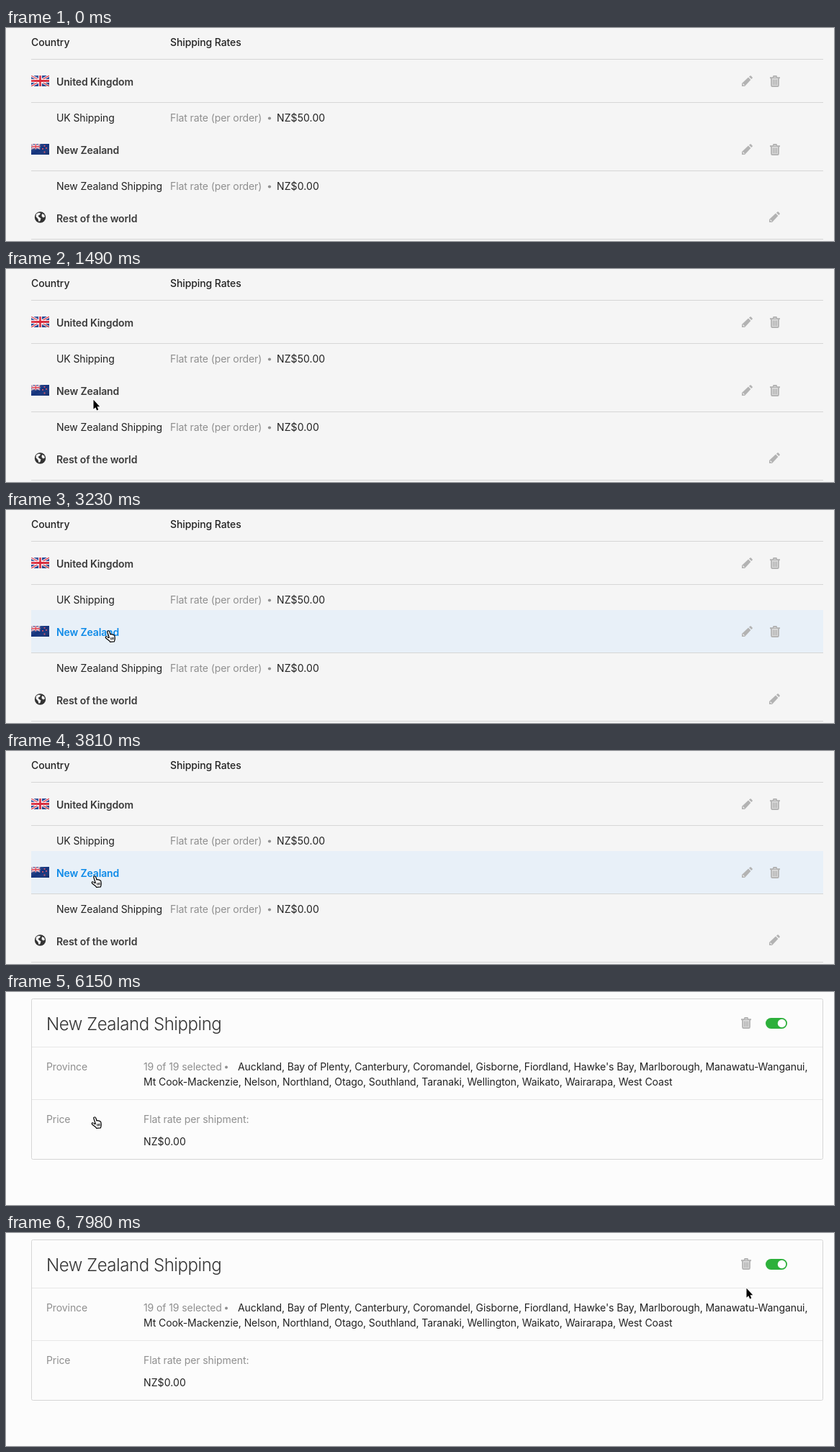
An HTML page for the animation above (8 s loop, 1150 px wide and 296 px high).

```html
<!DOCTYPE html>
<html lang="en">
<head>
<meta charset="utf-8">
<title>Shipping rates</title>
<style>
  html, body { margin: 0; width: 100%; height: 100%; overflow: hidden; background: #f5f5f5; }
  svg { display: block; }
  #stage { font: 14px Inter, sans-serif; font-optical-sizing: none; letter-spacing: -.095px; fill: #222; }
  .head { font-weight: 500; }
  .name { font-weight: 600; fill: #3a3a3a; letter-spacing: -.13px; }
  .muted { fill: #8f8f8f; }
  .price { letter-spacing: .1px; }
  .title { font-size: 24px; font-weight: 350; letter-spacing: -.45px; fill: #333; }
  .rule { stroke: #d6d6d6; }
  .soft { stroke: #e7e7e7; }
  .icon { fill: #b3b3b3; stroke: none; }
  .hover #hoverName { fill: #0d8ae8; }
  #hoverRow { visibility: hidden; fill: #e8f0f8; }
  .hover #hoverRow { visibility: visible; }
</style>
</head>
<body>
<svg id="stage" width="1150" height="296" viewBox="0 0 1150 296">
  <defs>
    <symbol id="jack" viewBox="0 0 24 14" preserveAspectRatio="none">
      <path fill="#20418f" d="M0 0H24V14H0Z"/>
      <path stroke="#fff" stroke-width="3" d="M0 0L24 14M24 0L0 14"/>
      <path stroke="#d8283a" stroke-width="1.1" d="M0 0L24 14M24 0L0 14"/>
      <path stroke="#fff" stroke-width="4.6" d="M12 0V14M0 7H24"/>
      <path stroke="#d8283a" stroke-width="2.6" d="M12 0V14M0 7H24"/>
    </symbol>
    <linearGradient id="gloss" x2="1" y2="1">
      <stop stop-color="#fff" stop-opacity=".25"/>
      <stop offset=".5" stop-color="#fff" stop-opacity="0"/>
      <stop offset="1" stop-opacity=".2"/>
    </linearGradient>
    <g id="pencil" class="icon">
      <path d="M0 15V11L9 2.6 12.4 6 4 15Z"/>
      <path d="M10 1.7 11.3.5q.8-.6 1.5 0l1.8 1.9q.6.7 0 1.4L13.3 5Z"/>
      <path d="M1.4 11.7 3.4 13.7" stroke="#f5f5f5" stroke-width="1.1"/>
    </g>
    <g id="trash" class="icon">
      <path d="M0 2.2H14V4.2H0Z"/>
      <path d="M4.5 2.7 5.2.8H8.8L9.5 2.7M2 4V13.5Q2 15.2 3.5 15.2H10.5Q12 15.2 12 13.5V4" fill="#dedede" stroke="#b0b0b0" stroke-width="1.7"/>
      <path d="M4.7 5.5V13.2M7 5.5V13.2M9.3 5.5V13.2" stroke="#b0b0b0" stroke-width="1.3"/>
    </g>
  </defs>

  <rect id="backdrop" width="1150" height="296"/>

  <g id="list">
    <rect id="hoverRow" x="35" y="139" width="1100" height="59"/>
    <path class="rule" d="M35 43.5H1135M35 103.5H1135M35 198.5H1135M35 293.5H1135"/>
    <g class="head"><text x="35" y="25">Country</text><text x="228" y="25">Shipping Rates</text></g>

    <use href="#jack" x="35" y="66" width="25" height="15"/>
    <rect x="35" y="66" width="25" height="15" fill="url(#gloss)"/>
    <text class="name" x="70" y="80">United Kingdom</text>
    <use href="#pencil" x="1022" y="66"/><use href="#trash" x="1061" y="66"/>
    <text x="70" y="130">UK Shipping</text>
    <text class="muted" x="228" y="130">Flat rate (per order)</text>
    <circle class="muted" cx="366" cy="125.5" r="2.1"/>
    <text class="price" x="376" y="130">NZ$50.00</text>

    <rect x="35" y="161" width="25" height="15" fill="#12327c"/>
    <use href="#jack" x="35" y="161" width="12.5" height="7.5"/>
    <path d="M53.5 163V164.8M51 167V168.8M56 166V167.8M53.5 171.5V173.5" stroke="#e45566" stroke-width="1.8"/>
    <rect x="35" y="161" width="25" height="15" fill="url(#gloss)"/>
    <text class="name" id="hoverName" x="70" y="175">New Zealand</text>
    <use href="#pencil" x="1022" y="161"/><use href="#trash" x="1061" y="161"/>
    <text x="70" y="225">New Zealand Shipping</text>
    <text class="muted" x="228" y="225">Flat rate (per order)</text>
    <circle class="muted" cx="366" cy="220.5" r="2.1"/>
    <text class="price" x="376" y="225">NZ$0.00</text>

    <circle cx="47.5" cy="263" r="7.7" fill="#333"/>
    <path fill="#f5f5f5" d="M42 258.5 45 256.7 48 257.2 47 259.5 44.5 261 46 263 48.5 264.5 47.5 268 45.5 269 44.5 265.5 41.5 262ZM50 258 53 259.5 54 262.5 51.5 263.5 49.5 261.5Z"/>
    <text class="name" x="70" y="270">Rest of the world</text>
    <use href="#pencil" x="1060" y="255"/>
  </g>

  <g id="details">
    <rect class="rule" x="35.5" y="9.5" width="1099" height="223" rx="2" fill="none"/>
    <path class="soft" d="M36 76.5H1134M36 149.5H1134"/>
    <text class="title" x="56" y="53">New Zealand Shipping</text>
    <use href="#trash" x="1021" y="35"/>
    <rect x="1055" y="36" width="30" height="15" rx="7.5" fill="#2db03b"/>
    <circle cx="1077.5" cy="43.5" r="5.7" fill="#fff"/>
    <g class="muted">
      <text x="56" y="109">Province</text>
      <text x="191" y="109">19 of 19 selected</text>
      <circle cx="306" cy="104.5" r="2"/>
      <text x="56" y="182">Price</text>
      <text x="191" y="182">Flat rate per shipment:</text>
    </g>
    <text x="322" y="109">Auckland, Bay of Plenty, Canterbury, Coromandel, Gisborne, Fiordland, Hawke's Bay, Marlborough, Manawatu-Wanganui,</text>
    <text x="191" y="130">Mt Cook-Mackenzie, Nelson, Northland, Otago, Southland, Taranaki, Wellington, Waikato, Wairarapa, West Coast</text>
    <text class="price" x="191" y="213">NZ$0.00</text>
  </g>

  <g id="cursor">
    <path id="arrow" d="M.5 .8V13.8L3.3 11.2 5.2 15.5 7.3 14.6 5.5 10.3H9.2Z" fill="#000" stroke="#fff" stroke-width="1.6" paint-order="stroke"/>
    <g id="hand" transform="translate(-6)" fill="#fff" stroke="#000" stroke-width="1.2" stroke-linejoin="round">
      <path d="M6.3 10.3 4 3.2Q3.3 1.1 4.8.8 6.1.5 6.8 2.3L8 6Q9 4.9 10.1 6.1 11.2 5.3 12 6.7 13.3 6.3 13.8 7.9L14.3 11Q14.4 13 13.4 15.8L7.5 16.3 6.8 15 2 11.3Q.5 9.4 2 8.8 3.2 8.5 5 10.3Z"/>
      <path d="M8.4 10.3 9 13.5M10.3 10 10.7 13.3M12.1 9.7 12.4 13" stroke-width=".9"/>
    </g>
  </g>
</svg>
<script>
const LOOP = 8000;
const easeOut = p => 1 - (1 - p) ** 2;
const smooth = p => p * p * (3 - 2 * p);
const late = p => p ** 3;

// Each move: start, end, steps, from, to, easing of x, easing of y
const moves = [
  [660, 1260, 11, [46, 288], [123, 182], smooth, easeOut],
  [1490, 1670, 4, [121, 181], [141, 178], smooth, smooth],
  [1850, 2020, 4, [142, 177], [141, 172], smooth, smooth],
  [2200, 2380, 4, [143, 172], [163, 168], smooth, smooth],
  [2740, 3340, 11, [163, 167], [141, 167], smooth, smooth],
  [3580, 3810, 4, [138, 168], [124, 173], easeOut, easeOut],
  [6480, 6750, 5, [150, 173], [490, 163], smooth, smooth],
  [7170, 7920, 14, [500, 163], [1021, 86], easeOut, late],
  [7980, 7980, 1, [1028, 76], [1028, 76], smooth, smooth]
];

const el = id => document.getElementById(id);
const show = (id, on) => el(id).style.display = on ? '' : 'none';
const mix = (a, b, p) => a + (b - a) * p;

function cursorAt(t) {
  const move = moves.filter(m => t >= m[0]).pop();
  if (!move) return null;
  const [start, end, steps, from, to, easeX, easeY] = move;
  const last = Math.max(1, steps - 1);
  const p = end > start ? Math.min(last, Math.floor((t - start) / (end - start) * last + 1e-6)) / last : 1;
  return [mix(from[0], to[0], easeX(p)), mix(from[1], to[1], easeY(p))].map(Math.round);
}

function draw(t) {
  const pos = cursorAt(t);
  const overLink = t >= 2740 && t < 6480 && pos[0] < 158;
  const loading = t >= 5010 && t < 6150;
  show('list', t < 5010);
  show('details', t >= 6150);
  el('backdrop').style.fill = loading ? '#c8c8c8' : t < 5010 ? '#f5f5f5' : '#fcfcfc';
  el('list').classList.toggle('hover', overLink);
  show('cursor', pos);
  show('hand', overLink);
  show('arrow', !overLink);
  if (pos) el('cursor').setAttribute('transform', `translate(${pos})`);
}

const began = performance.now();
function tick() {
  draw((performance.now() - began) % LOOP);
  requestAnimationFrame(tick);
}
tick();
</script>
</body>
</html>
```
